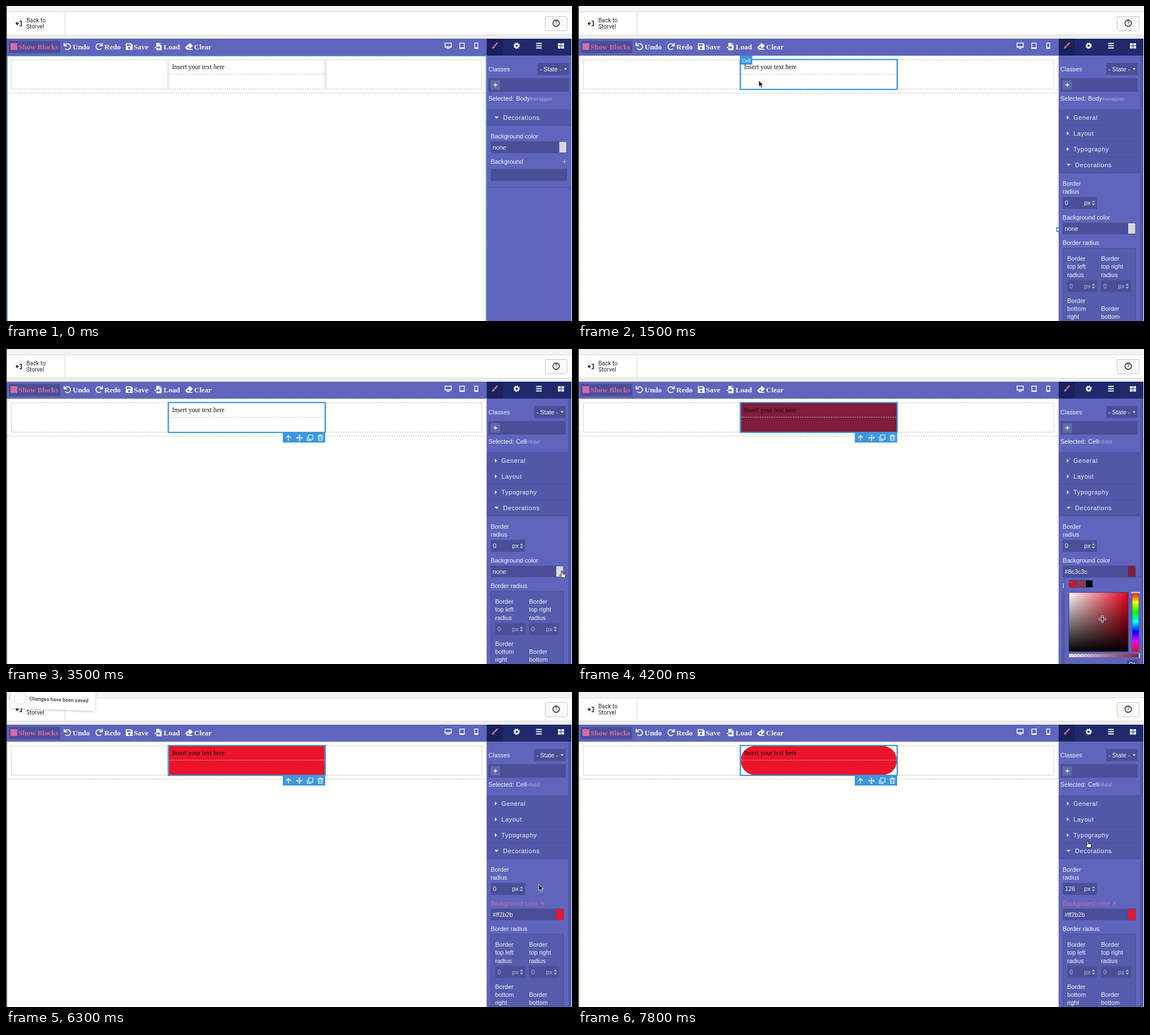
Write an HTML page that moves like this. It is 1002 by 559 pixels and loops after 8000 ms.

```html
<!DOCTYPE html>
<html lang="en">
<head>
<meta charset="utf-8">
<title>Block editor</title>
<style>
  html, body { margin: 0; width: 100%; height: 100%; overflow: hidden; background: #fffffc; }
  svg { display: block; }
  text { white-space: pre; }
  .ui { font: 10.8px "Liberation Sans", Arial, sans-serif; fill: #f4f4fb; }
  .bar { font: bold 13px "Liberation Serif", "Times New Roman", serif; fill: #f6f6fb; }
  .page { font: 11.5px "Liberation Serif", "Times New Roman", serif; fill: #111; }
  .nav { font: 10.2px Roboto, sans-serif; fill: #212b36; }
  .wide { letter-spacing: .67px; }
  .dim { fill: #b3b6dc; }
  .id { font-size: 9.5px; fill: #a9addc; }
  .tag { font-size: 8.9px; fill: #fff; }
  .field { fill: #4a4f97; }
  .head { fill: #5258a8; }
  .blue { fill: #3b97e0; }
  .outline { fill: none; stroke: #3b97e0; stroke-width: 2.2; }
  .dash { fill: none; stroke: #bdbdbd; stroke-dasharray: 2.6 1.6; }
  .icon { fill: #f6f6fb; }
  .line { fill: none; stroke: #f6f6fb; stroke-width: 1.8; }
  .sep { stroke: #454a8d; }
</style>
</head>
<body>
<svg id="stage" width="1002" height="559" viewBox="0 0 1002 559"></svg>
<script>
const rect = (x, y, x2, y2, attr = '') =>
  `<rect x="${x}" y="${y}" width="${x2 - x}" height="${y2 - y}" ${attr}/>`;
const text = (x, y, s, cls = 'ui', attr = '') => `<text x="${x}" y="${y}" class="${cls}" ${attr}>${s}</text>`;
const path = (d, cls = 'icon', attr = '') => `<path d="${d}" class="${cls}" ${attr}/>`;
const group = (id, ...parts) => `<g id="${id}">${parts.join('')}</g>`;
const box = (x, y, x2, y2, cls) => rect(x, y, x2, y2, `class="${cls}"`);
const arrows = (x, y) => path(`M${x} ${y - 1.3}l3-3.4 3 3.4zm0 2.6l3 3.4 3-3.4z`, 'dim');
const fold = (y, label, open) => box(851, y, 1001, y + 28, 'head') +
  path(`M851 ${y + 28}H1001`, 'sep') +
  (open ? path(`M865 ${y + 12}h7l-3.5 4z`) : path(`M865.5 ${y + 10.5}v7l3.7-3.5z`)) +
  text(open ? 880 : 877, y + 18, label, 'ui wide');
const number = (x, x2, y, id, dim) => box(x, y, x2, y + 21, 'field') +
  text(x + 4, y + 14, '0', dim, `id="${id}"`) + text(x2 - 23, y + 14, 'px', dim) + arrows(x2 - 9.5, y + 10.5);
const lines = (x, y, words) => words.split(' ').map((w, i) => text(x, y + i * 14.4, w)).join('');

const header = rect(0, 0, 1002, 11, 'fill="#f2f3f4"') + rect(0, 51, 1002, 58, 'fill="#edeeec"') +
  path('M0 10.5H1002M104.5 11V51M0 51.5H1002', '', 'stroke="#d9dcdc"') +
  path('M24 27h3.2v8H24M23 31h-5m2.6-2.6L18 31l2.6 2.6', '', 'fill="none" stroke="#212b36" stroke-width="1.7"') +
  text(36, 29, 'Back to', 'nav') + text(36, 40, 'Storvel', 'nav') +
  rect(954.5, 18.5, 993.5, 44, 'rx="2.5" fill="#f8f9f9" stroke="#c6ccd2"') +
  '<circle cx="974" cy="30.5" r="5.7" fill="none" stroke="#212b36" stroke-width="1.5"/>' +
  text(974, 34, '?', 'nav', 'text-anchor="middle" font-weight="700"');

const toolbar = rect(1, 58, 851, 88, 'fill="#5f65bc"') + box(5, 62, 96, 83.5, 'field') +
  rect(8, 66, 20, 78, 'rx="1" fill="#d46ca4"') + text(22, 76.5, 'Show Blocks', 'bar', 'style="fill:#d46ca4"') +
  path('M104 70.5a5.2 5.2 0 1 1 1 5M103 65.5v5h5', 'line') + text(118, 76.5, 'Undo', 'bar') +
  path('M169.5 70.5a5.2 5.2 0 1 0-1 5M170.5 65.5v5h-5', 'line') + text(174, 76.5, 'Redo', 'bar') +
  path('M212 66h9.5l2.7 2.7V78H212zM214 67.7v3h6.5v-3zM218 72.4a2 2 0 1 0 .1 0z', 'icon', 'fill-rule="evenodd"') +
  text(226, 76.5, 'Save', 'bar') +
  path('M266 65.5h6v3.4h3.5V78.5H266v-4h4v2l3-3-3-3v2h-4zM273 65.5l2.5 2.6H273zM263 72.5h3v2h-3z') +
  text(279, 76.5, 'Load', 'bar') +
  path('M317.5 73l7-6.6q1-.8 2 0l3.6 3.4q.8.9 0 1.8L325 76h5v1.8h-9.3l-3.2-3.3q-.7-.8 0-1.5zm3.4.3l2.5 2.5 1.7-1.6-2.6-2.6z', 'icon', 'fill-rule="evenodd"') +
  text(333, 76.5, 'Clear', 'bar') +
  path('M776.5 65h12.5v8.8h-12.5zm1.5 1.4v5.2h9.5v-5.2zM780 74.5h5.5v1.5H780zM802.7 65h9.3v11h-9.3zm1.4 1.4v7h6.5v-7zM829 65h7v11h-7zm1.3 1.6v6.6h4.4v-6.6z', 'icon', 'fill-rule="evenodd"');

const tabs = rect(851, 58, 1001, 88, 'fill="#1f2a6d"') + rect(851, 58, 880, 88, 'fill="#19215b"') +
  path('M870.5 64.5q1 .8 0 2l-4.6 5.4-2.2-2 5-5q1-.9 1.8-.4zM863 70.4l2.2 2.2q-.6 3.4-5.8 2.8 1.5-.7 1.7-2.6.4-1.8 1.9-2.4z', '', 'fill="#d46ca4"') +
  '<circle cx="904" cy="70.5" r="3.2" fill="none" stroke="#f6f6fb" stroke-width="2.5"/>' +
  '<circle cx="904" cy="70.5" r="4.8" fill="none" stroke="#f6f6fb" stroke-width="1.8" stroke-dasharray="1.9 1.87"/>' +
  path('M938.5 66.5h10m-10 4h10m-10 4h10', 'line') +
  path('M977 66h5v4.2h-5zm6 0h5v4.2h-5zM977 71.3h5v4.2h-5zm6 0h5v4.2h-5z');

const classes = right => box(right - 56, 101, right, 122.5, 'field') + text(right - 52, 115.5, '- State -') +
  path(`M${right - 9} 110.5h5l-2.5 3z`) + box(854, 128, right, 152, 'field') +
  rect(858, 131.5, 874.5, 148.5, 'rx="1" fill="#6468a7"') + path('M866.3 136.5v7m-3.5-3.5h7', 'line', 'style="stroke-width:1.3"');

const sidebar = rect(851, 88, 1001, 559, 'fill="#5f65bd"') +
  text(854, 115.5, 'Classes') + text(854, 168, 'Selected:') + text(903, 168, '', 'ui', 'id="picked"') +
  group('bodyPanel', classes(997), path('M851 184H1001M851 322H1001', 'sep'), fold(184, 'Decorations', true),
    text(858, 234.5, 'Background color'), box(858, 240, 993, 261, 'field'), text(861.5, 254.5, 'none'),
    rect(979, 240.5, 992.5, 260.5, 'fill="#d9d9dc" stroke="#454a8d"'),
    text(858, 279.5, 'Background'), path('M988.7 272.5v7m-3.5-3.5h7', '', 'stroke="#c9cbea"'),
    box(858, 289, 993, 310.5, 'field')) +
  group('cellPanel', classes(991), path('M851 184H995', 'sep'), fold(184, 'General'), fold(212, 'Layout'),
    fold(240, 'Typography'), fold(268, 'Decorations', true), lines(858, 318.7, 'Border radius'),
    number(858, 919, 339, 'radius', 'ui'),
    text(858, 378.5, 'Background color', 'ui', 'id="label"'), box(858, 384.5, 987, 405, 'field'),
    text(861.5, 398.5, 'none', 'ui', 'id="hex"'),
    rect(973.5, 385, 987, 404.5, 'id="swatch" stroke="#454a8d"'), text(858, 424, 'Border radius'),
    rect(858.5, 430, 987, 570, 'fill="#565cad" stroke="#474c93"'),
    lines(866, 452, 'Border top left radius'.replace('top left', 'top\u00a0left')),
    lines(926, 452, 'Border top\u00a0right radius'), number(866, 919, 486.5, 'r1', 'ui dim'),
    number(926, 979, 486.5, 'r2', 'ui dim'), lines(866, 526.5, 'Border bottom right'), lines(926, 541, 'Border bottom'),
    rect(995, 88, 1001, 559, 'fill="#525aab"'));

const canvas = rect(288, 95.5, 564.5, 147.5, 'id="fill"') +
  path('M2.5 559V88.5H850V559M2 154.5H850M9.5 95.5H286V147.5H9.5zM288 95.5H564.5V147.5H288zM566.5 95.5H842.5V147.5H566.5zM288 121H564.5', 'dash') +
  text(294, 112, 'Insert your text here', 'page') +
  group('bodyEdge', path('M2.5 559V88.5H850V559', '', 'fill="none" stroke="#3b97e0" stroke-width="1.3"')) +
  group('bodyGrip', rect(847.5, 393.5, 854, 400, 'fill="#fff" stroke="#3b97e0" stroke-width="2"')) +
  group('selection', box(287.5, 95, 565, 148, 'outline'), box(490, 149, 565, 166, 'blue'),
    path('M500 162.5v-9m-4 4l4-4.2 4 4.2', 'line', 'style="stroke-width:1.5"'),
    path('M514.5 157.5h10m-5-5v10', 'line', 'style="stroke-width:1.3"'),
    path('M519.5 151.6l2.2 2.6h-4.4zm0 11.8l2.2-2.6h-4.4zM513.6 157.5l2.6-2.2v4.4zm11.8 0l-2.6-2.2v4.4z'),
    path('M535.7 152.5h7.7v7.7h-7.7zM533.3 155v7.4h7.5', 'line', 'style="stroke-width:1.2"'),
    path('M552.8 155.2h7.4l-.6 7.3h-6.2zM551.5 153.6h10m-6.6 0v-1.4h3.2v1.4M555 157v4m3-4v4', 'line', 'style="stroke-width:1.1"')) +
  group('grip', rect(562.5, 118.7, 567.8, 124.5, 'fill="#fff" stroke="#3b97e0" stroke-width="2"')) +
  group('hover', '<rect id="hoverBox" class="outline"/><rect id="hoverTag" class="blue" height="16"/>',
    text(0, 0, '', 'ui tag', 'id="hoverName"'));

const picker = group('picker', rect(861, 405, 999, 570, 'fill="#5f65bd" stroke="#484d96"'),
  ['#dd1428', '#a0363f', '#000'].map((c, i) => rect(869.5 + i * 14.5, 410.5, 882 + i * 14.5, 423, `fill="${c}" stroke="#333a7c"`)).join(''),
  rect(869, 432, 974, 537, 'fill="url(#sat)"'), rect(869, 432, 974, 537, 'fill="url(#val)" stroke="#33386f"'),
  rect(981, 432, 993, 537, 'fill="url(#hue)" stroke="#4a4f97"'), rect(979, 431, 995, 433.5, 'fill="#c9cad6"'),
  rect(869, 541, 995, 547, 'fill="url(#check)"'), rect(869, 541, 995, 547, 'fill="url(#alpha)"'),
  rect(992.5, 540, 995, 548, 'fill="#c9cad6"'), rect(971, 551.5, 993, 570, 'rx="1" fill="#4a4f97"'), text(975, 563.5, 'Ok'));

const toast = group('toast', rect(8, 3, 157.5, 37, 'rx="2" fill="#fff" filter="url(#shadow)"'),
  rect(8, 34.5, 157, 37, 'id="timer" fill="#000" fill-opacity=".22"'),
  '<circle cx="25" cy="19.5" r="10.3" fill="none" stroke="#dcefd0" stroke-width="1.5"/>',
  '<rect id="tip" height="3.3" rx="1" fill="#a5d28a"/><rect id="long" height="3.3" rx="1" fill="#a5d28a"/>',
  text(41, 22.5, 'Changes have been saved', '', 'style="font:700 9px Roboto,sans-serif;fill:#555"'));

const cursors = group('arrow', path('M0 0V11.6L2.7 9.2 4.7 13.6 6.6 12.7 4.7 8.5H8.2Z', '', 'fill="#111" stroke="#fff" stroke-width=".9"')) +
  group('hand', path('M0 0q1.3-.4 1.5 1V5l4.2.9q1.4.4 1.2 2L6.2 12H0L-3.6 7.6q.2-1.3 1.6-.7L-.9 8V1Q-.9.2 0 0Z', '', 'fill="#fff" stroke="#111"')) +
  group('cross', path('M-6.5 0h13M0-6.5v13', '', 'stroke="#fff" stroke-width="3.6"'), path('M-6 0H6M0-6V6', '', 'stroke="#111" stroke-width="1.5"'));

const stops = list => list.map((c, i) => `<stop offset="${i / (list.length - 1)}" stop-color="${c}"/>`).join('');
const vertical = 'x1="0" y1="0" x2="0" y2="1"';
const defs = `<defs><linearGradient id="sat">${stops(['#fff', '#eb0019'])}</linearGradient>
  <linearGradient id="val" ${vertical}><stop stop-opacity="0"/><stop offset="1"/></linearGradient>
  <linearGradient id="hue" ${vertical}>${stops(['#f00', '#ff0', '#0f0', '#0ff', '#00f', '#f0f', '#f00'])}</linearGradient>
  <linearGradient id="alpha"><stop class="ink" stop-opacity="0"/><stop class="ink" offset="1"/></linearGradient>
  <pattern id="check" width="6" height="6" patternUnits="userSpaceOnUse"><path d="M0 0h6v6H0z" fill="#fff"/><path d="M0 0h3v3H0zM3 3h3v3H3z" fill="#ccc"/></pattern>
  <filter id="shadow" x="-10%" y="-40%" width="120%" height="190%"><feDropShadow dx="0" dy="1" stdDeviation="2.2" flood-opacity=".3"/></filter></defs>`;

stage.innerHTML = defs + canvas + header + toolbar + sidebar + tabs + picker + toast + rect(0, 0, 1.3, 559, 'fill="#111"') + cursors;

const $ = id => document.getElementById(id);
const show = (id, on) => $(id).style.display = on ? '' : 'none';
const set = (id, attrs) => { for (const k in attrs) $(id).setAttribute(k, attrs[k]); };
const clamp = (v, a, b) => Math.min(b, Math.max(a, v));

// Rows are [time, value, value, ...]
function tween(keys, t, ease = u => u) {
  const i = keys.findIndex(k => k[0] > t);
  if (i < 0) return keys[keys.length - 1].slice(1);
  if (i === 0) return keys[0].slice(1);
  const a = keys[i - 1], b = keys[i], u = ease((t - a[0]) / (b[0] - a[0]));
  return a.slice(1).map((v, j) => v + (b[j + 1] - v) * u);
}
const smooth = u => u * u * (3 - 2 * u);

const route = [[700, 175, 52], [800, 250, 74], [900, 320, 132], [2300, 320, 132], [3100, 984, 394],
  [3700, 984, 394], [4100, 925, 485], [4600, 955, 430], [5600, 955, 430], [5800, 968, 515],
  [5950, 925, 410], [6100, 943, 341], [6300, 943, 341], [7000, 911, 348], [7100, 911, 348], [7800, 902, 264]];
const turns = [[0, -6.2, 2], [.33, 0, -2], [.66, 3.2, 2], [1, 0, 0]];
// Check strokes: progress, left, top, width in em
const tipKeys = [[.54, .125, .125, 0], [.7, -.25, .625, 1.625], [.84, .75, 1.0625, .5], [1, .1875, 1.125, .75]];
const longKeys = [[.65, .625, 1.625, 0], [.84, .875, .9375, 1.125], [1, .4375, .9375, 1.375]];

function stroke(id, keys, p, angle) {
  const em = 10.4, [x, y, w] = tween(keys, p).map(v => v * em);
  const left = 14.6 + x, top = 9 + y;
  set(id, { x: left, y: top, width: w, transform: `rotate(${angle} ${left + w / 2} ${top + 1.65})` });
}

function drawToast(t) {
  const age = t - (t < 6300 ? 1600 : 6300);
  show('toast', age >= 0 && age <= 1000);
  const [dy, angle] = tween(turns, age / 500);
  set('toast', { transform: `translate(0 ${dy}) rotate(${angle} 82.5 20)` });
  set('timer', { width: age > 0 ? 149 * clamp(1 - age / 1000, 0, 1) : 0 });
  stroke('tip', tipKeys, (age + 60) / 750, 45);
  stroke('long', longKeys, (age + 60) / 750, -45);
}

const zones = [['Cell', 287.5, 95, 565, 148], ['Cell', 9.5, 95, 286, 148], ['Cell', 566.5, 95, 843, 148],
  ['Row', 2.5, 88.5, 850, 154.5], ['Body', 2.5, 88.5, 850, 560]];
function drawHover(x, y, on) {
  const zone = on && zones.find(z => x > z[1] && y > z[2] && x < z[3] && y < z[4]);
  show('hover', zone);
  if (!zone) return;
  const [name, l, top, r, b] = zone, tagTop = Math.max(88, top - 7);
  set('hoverBox', { x: l, y: top, width: r - l, height: b - top });
  set('hoverTag', { x: l - 1, y: tagTop, width: name.length * 4.2 + 5.2 });
  set('hoverName', { x: l + 2.7, y: tagTop + 11.8 });
  $('hoverName').textContent = name;
}

function drawColour(t) {
  const [x, y] = tween(route, Math.min(t, 4600), smooth), on = t >= 4100;
  const s = clamp((x - 867.7) / 105, 0, 1), v = clamp(1 - (y - 432) / 105, 0, 1), pale = v * (1 - s);
  const byte = n => Math.round(n * 255).toString(16).padStart(2, '0');
  const colour = `rgb(${235 * v},${118 * pale},${247 * pale})`;
  $('hex').textContent = on ? '#' + byte(v) + byte(pale) + byte(pale) : 'none';
  set('swatch', { fill: on ? colour : '#d9d9dc' });
  set('fill', { fill: on ? colour : 'none' });
  document.querySelectorAll('.ink').forEach(e => e.setAttribute('stop-color', on ? colour : '#000'));
}

function draw(now) {
  const t = Math.floor(now % 8000 / 100) * 100;
  const [x, y] = tween(route, t, smooth);
  const between = (a, b) => t >= a && t < b;

  show('bodyEdge', t < 1500);
  show('bodyGrip', between(700, 1600));
  show('bodyPanel', t < 1500);
  show('cellPanel', t >= 1500);
  show('selection', t >= 1600);
  show('grip', between(1600, 3500));
  show('picker', between(3600, 6300));
  $('picked').innerHTML = t < 1600 ? 'Body<tspan class="id">#wrapper</tspan>' : 'Cell<tspan class="id">#ih6d</tspan>';
  $('label').textContent = t < 6300 ? 'Background color' : 'Background color ✕';
  $('label').style.fill = t < 6300 ? '' : '#d46ca4';

  const radius = t < 7100 ? 0 : Math.round((348 - y) * 1.5);
  $('radius').textContent = radius;
  set('fill', { rx: Math.min(26, radius * .72) });
  drawColour(t);
  drawToast(t);
  drawHover(x, y, between(700, 3100));

  const inPicker = between(3700, 6100) && x > 869 && x < 974 && y > 424 && y < 537;
  const hand = between(3000, 3800) || t >= 7000;
  show('cross', inPicker);
  show('hand', hand && !inPicker);
  show('arrow', t >= 700 && !hand && !inPicker);
  for (const id of ['cross', 'hand', 'arrow']) set(id, { transform: `translate(${x} ${y})` });
}

let start;
function tick(now) {
  start ??= now;
  draw(now - start);
  requestAnimationFrame(tick);
}
draw(0);
requestAnimationFrame(tick);
</script>
</body>
</html>
```
